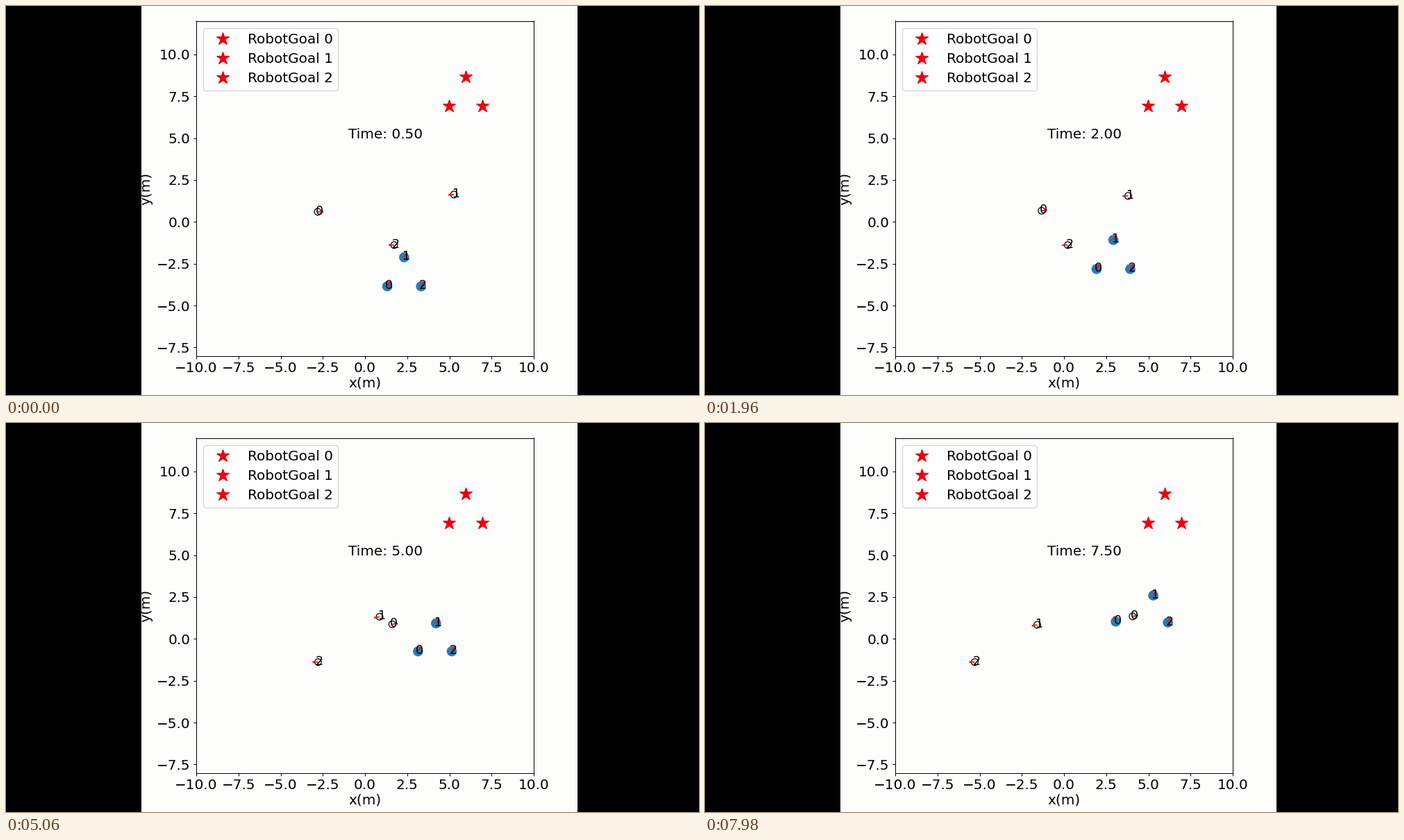
A matplotlib script that plays this animation: 998 by 561 pixels, repeating every 8000 ms.

```python
import numpy as np
import matplotlib.pyplot as plt
from matplotlib.animation import FuncAnimation
from matplotlib.patches import Circle, Polygon, Rectangle

W, H, DPI = 998, 561, 72
FRAMES, INTERVAL = 250, 32
STEP_MS, STEP_S, START_S = 279, 0.25, 0.5
PAPER = "#fdfdfc"
PT = 1.25  # stage pixels per nominal point

plt.rcParams.update({
    "font.family": "DejaVu Sans", "font.size": 16 * PT,
    "axes.linewidth": 0.8 * PT, "axes.labelpad": 4 * PT,
    "patch.linewidth": PT, "lines.markeredgewidth": PT,
    **{f"{axis}tick.major.{key}": size * PT for axis in "xy"
       for key, size in (("size", 3.5), ("width", 0.8), ("pad", 3.5))},
})

fig = plt.figure(figsize=(W / DPI, H / DPI), dpi=DPI, facecolor=PAPER)
left, right, top, bottom = 274, 760, 21.5, 504.5
ax = fig.add_axes([left / W, 1 - bottom / H, (right - left) / W, (bottom - top) / H],
                  facecolor=PAPER)
ax.set(xlim=(-10, 10), ylim=(-8, 12), xlabel="x(m)", ylabel="y(m)")
ax.set_xticks(np.arange(-10, 10.1, 2.5))
ax.set_yticks(np.arange(-7.5, 10.1, 2.5))
ax.xaxis.labelpad = 2 * PT

for x0, x1 in ((0, 195), (823, W)):
    fig.add_artist(Rectangle((x0 / W, 0), (x1 - x0) / W, 1, transform=fig.transFigure,
                             fc="black", lw=0, zorder=10))


def triangle(i):
    """Corner i of the formation: left, apex, right."""
    return np.array([i, np.sqrt(3) * (i == 1)])


for i in range(3):
    ax.plot(*(triangle(i) + (4.96, 6.93)), "*", color="#eb0010", ms=15 * PT, ls="none",
            label=f"RobotGoal {i}")
ax.legend(loc="upper left", labelspacing=0.455, borderpad=0.38)
clock = ax.text(-1, 5, "")

ARROW = np.array([(0, .1), (0, -.1), (.8, -.1), (.8, -.3), (1, 0), (.8, .3), (.8, .1)])


class Mover:
    """Moves at a steady velocity, changed by `turn` during the time `window`."""

    def __init__(self, name, start, velocity, turn=(0, 0), window=(4.5, 7.5),
                 radius=0.2, **style):
        self.start, self.velocity, self.turn = map(np.array, (start, velocity, turn))
        self.window = window
        self.body = ax.add_patch(Circle(start, radius, zorder=2, **style))
        self.arrow = ax.add_patch(Polygon(ARROW, fc="red", ec="none", zorder=3))
        self.label = ax.text(0, 0, name, fontsize=14 * PT, zorder=4)

    def place(self, t):
        begin, end = self.window
        pos = (self.start + self.velocity * (t - START_S)
               + self.turn * (np.clip(t, begin, end) - begin))
        vx, vy = self.velocity + self.turn * (begin < t <= end)
        ahead = np.array([(vx, vy), (-vy, vx)]) / np.hypot(vx, vy)
        self.body.center = pos
        self.arrow.set_xy(pos + 0.34 * ARROW @ ahead)
        self.label.set_position(pos + (-0.13, -0.165))


def robot(i, **dodge):
    return Mover(str(i), triangle(i) + (1.32, -3.85), (0.405, 0.69), radius=0.3,
                 fc="#2a7bb0", ec="none", **dodge)


hollow = dict(fill=False, ec="black")
movers = [
    robot(0, turn=(-0.62, 0.03), window=(5.75, 7.5)),
    robot(1, turn=(0.09, -0.08), window=(4.25, 5.75)),
    robot(2),
    Mover("0", (-2.80, 0.60), (0.981, 0.044), turn=(0, 0.145), **hollow),
    Mover("1", (5.27, 1.63), (-0.979, -0.053), turn=(0, -0.14), **hollow),
    Mover("2", (1.73, -1.386), (-1.003, 0), **hollow),
]


def update(frame):
    t = START_S + STEP_S * (frame * INTERVAL // STEP_MS)
    clock.set_text(f"Time: {t:.2f}")
    for mover in movers:
        mover.place(t)


anim = FuncAnimation(fig, update, frames=FRAMES, interval=INTERVAL,
                     init_func=lambda: update(0), repeat=True, repeat_delay=0, blit=False)
plt.show()
```
